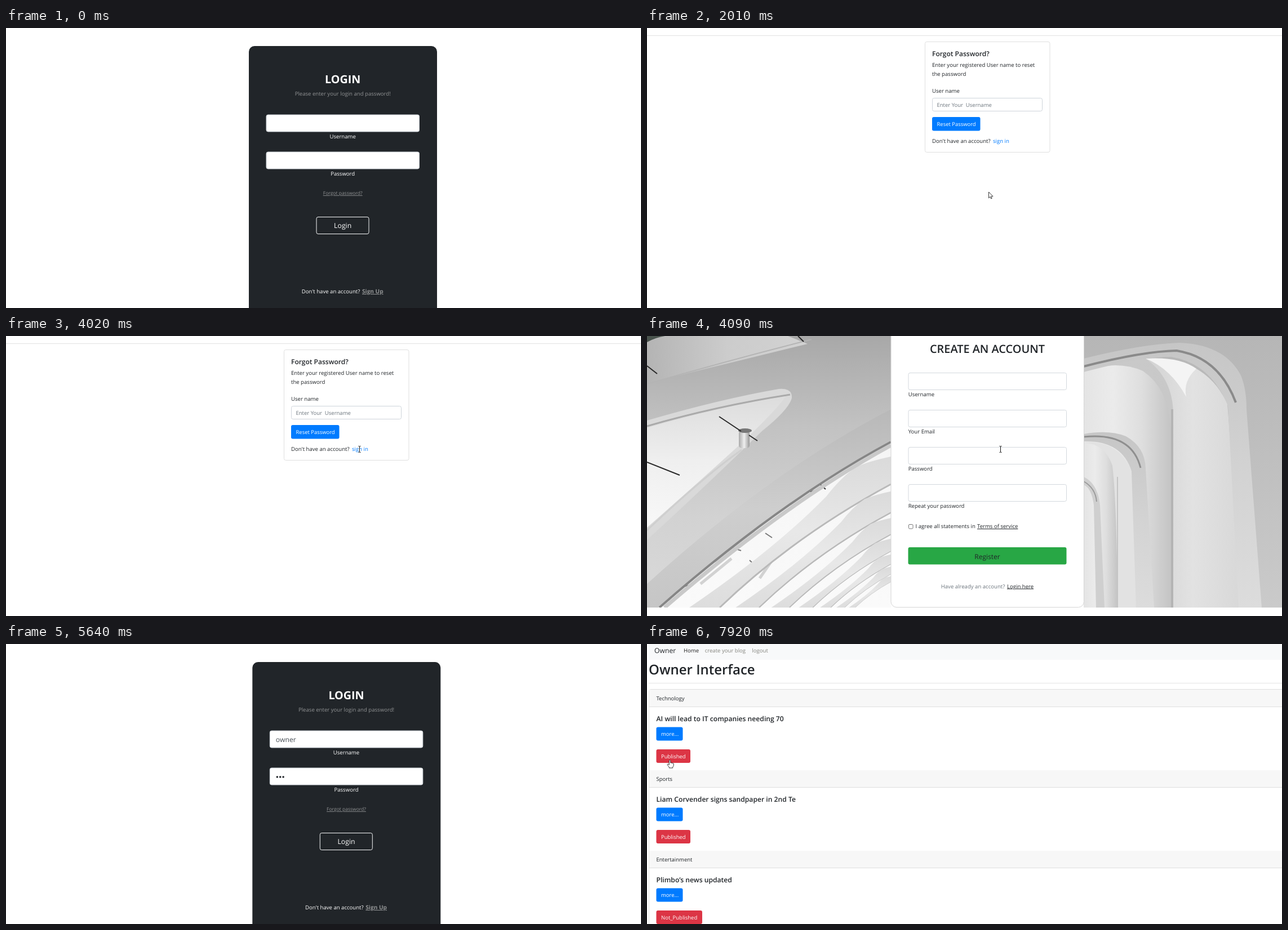
These frames come from a looping animation (1127 px wide and 497 px high, 7990 ms). An HTML page:

```html
<!DOCTYPE html>
<html lang="en">
<head>
<meta charset="utf-8">
<title>Blog accounts</title>
<style>
html, body { margin: 0; width: 100%; height: 100%; overflow: hidden; background: #fff; }
svg { display: block; width: 1127px; height: 497px; }
text { font-family: "Open Sans", "Noto Sans", sans-serif; white-space: pre; text-rendering: geometricPrecision; }
.u { text-decoration: underline; }
.mid { text-anchor: middle; }
</style>
</head>
<body>
<svg id="stage" viewBox="0 0 1127 497" xmlns="http://www.w3.org/2000/svg"></svg>
<script>
const LOOP = 7990;
const INK = '#212529', GREY = '#919394', BLUE = '#007bff', RED = '#dc3545', EDGE = '#ced4da';
const BODY = 9.58;

const text = (x, y, str, { size = BODY, fill = INK, weight = 400, cls = '' } = {}) =>
  `<text x="${x}" y="${y}" font-size="${size}" fill="${fill}" font-weight="${weight}" class="${cls}">${str}</text>`;
const box = (x, y, w, h, fill, stroke = 'none', r = 3) =>
  `<rect x="${x}" y="${y}" width="${w}" height="${h}" rx="${r}" fill="${fill}" stroke="${stroke}"/>`;
const path = (d, fill, stroke = 'none', width = 1) =>
  `<path d="${d}" fill="${fill}" stroke="${stroke}" stroke-width="${width}"/>`;
const grad = (id, x2, y2, ...stops) =>
  `<linearGradient id="${id}" x1="0" y1="0" x2="${x2}" y2="${y2}">` +
  stops.map((c, i) => `<stop offset="${i / (stops.length - 1)}" stop-color="${c}"/>`).join('') +
  '</linearGradient>';
const group = (id, content) => `<g id="${id}">${content}</g>`;

function login() {
  const c = 597.7;
  const mid = (y, str, o) => text(c, y, str, { cls: 'mid', fill: '#fff', ...o });
  return box(431, 32, 334, 500, INK, 'none', 10) +
    mid(98, 'LOGIN', { size: 19.7, weight: 700 }) +
    mid(119.5, 'Please enter your login and password!', { fill: GREY }) +
    box(462, 154, 271.5, 30, '#fff', EDGE) +
    mid(195.5, 'Username') +
    box(462, 220, 271.5, 30, '#fff', EDGE) +
    mid(261.5, 'Password') +
    mid(296, 'Forgot password?', { size: 8.5, fill: GREY, cls: 'mid u' }) +
    box(551, 335.5, 93, 30, 'none', '#f8f9fa') +
    mid(355, 'Login', { size: 12.3 }) +
    text(524.7, 471, 'Don\'t have an account?', { fill: '#fff' }) +
    text(632, 471, 'Sign Up', { fill: GREY, weight: 700, size: 10.1, cls: 'u' }) +
    group('filled', text(472.5, 174, 'owner', { size: 12.2, fill: '#495057' }) +
      [475, 480.4, 485.8].map(x => `<circle cx="${x}" cy="236" r="1.8" fill="${INK}"/>`).join(''));
}

function forgot() {
  return path('M0 13.5H1127', 'none', '#e2e2e2') +
    box(493.5, 24.5, 221.5, 196, '#fff', '#dfdfdf') +
    text(506, 50, 'Forgot Password?', { size: 12, weight: 600 }) +
    text(506, 69, 'Enter your registered User name to reset') +
    text(506, 84.5, 'the password') +
    text(506, 115, 'User name') +
    box(506.5, 124.5, 195, 23, '#fff', EDGE) +
    text(514.5, 139.7, 'Enter Your  Username', { size: 9.5, fill: '#6c757d' }) +
    box(506, 158, 85.5, 24.5, BLUE) +
    text(514.5, 174, 'Reset Password', { size: 9.45, fill: '#fff' }) +
    text(506, 204, 'Don\'t have an account?') +
    text(614, 204, 'sign in', { fill: BLUE });
}

// Ribs under the great beam, shrinking toward the lower right corner
function ribs() {
  const rib = path('M372 232Q345 250 318 285Q225 380 75 482H128Q260 355 433 262V214Q395 222 372 232Z', 'url(#rib)') +
    path('M433 263Q260 356 129 482', 'none', '#b9b9b9', 3);
  return [0, 1, 2, 3, 4, 5, 6].map(i =>
    `<g transform="translate(433 482) scale(${0.77 ** i}) translate(-433 -482)">${rib}</g>`).join('');
}

// Pale vaulted hall in soft grey tones
function hallLeft() {
  return box(0, 0, 433, 482, 'url(#air)', 'none', 0) +
    path('M115 375L132 380M152 376L167 381M85 406L104 410M182 398L194 409M210 350L222 358M60 446L76 442', 'none', '#777', 2) +
    path('M120 400L190 345M95 440L150 395M200 430L240 372', 'none', '#d2d2d2', 5) +
    ribs() +
    path('M290 277L298 274M308 264L317 272', 'none', '#333', 2) +
    path('M0 0H433V186Q240 288 20 482H0Z', 'url(#beam)') +
    path('M433 186Q240 288 20 482H0V440Q220 240 433 130Z', 'url(#belly)') +
    path('M433 188Q240 291 22 482', 'none', '#868686', 4) +
    path('M433 194Q246 296 31 482', 'none', '#c9c9c9', 7) +
    path('M0 0H250L285 14L0 84Z', 'url(#roof)') +
    path('M0 85Q150 42 292 6', 'none', '#b4b4b4', 2) +
    path('M0 150Q130 112 234 94Q258 92 257 110Q252 130 205 168Q95 275 0 362Z', '#d9d9d9') +
    path('M0 163Q120 128 246 106Q240 121 168 190Q80 270 0 340Z', 'url(#sky)') +
    path('M0 160Q125 124 254 104', 'none', '#aaaaaa', 3) +
    path('M0 345Q100 250 168 202', 'none', '#cfcfcf', 3) +
    box(163, 168, 19, 31, 'url(#lamp)', 'none', 5) +
    '<ellipse cx="174" cy="168" rx="12" ry="4" fill="#777"/>' +
    path('M128 143L167 169M181 176L196 186M0 224L58 247M0 53L18 67M268 0L278 10', 'none', '#292929', 2) +
    path('M0 0H32Q14 3 0 11Z', '#49534d');
}

function hallRight() {
  return box(775, 0, 352, 482, 'url(#wall)', 'none', 0) +
    path('M775 55Q860 38 915 40Q938 60 935 130V482H775Z', 'url(#side)') +
    path('M775 62Q835 42 880 62Q925 92 930 165V482H775Z', 'url(#niche)') +
    path('M885 40Q920 38 951 47Q1005 66 1030 120Q1044 290 1052 482H934V140Q934 75 885 40Z', 'url(#pillar)') +
    path('M885 40Q930 58 957 108Q951 80 975 58Q945 36 885 40Z', '#f4f4f4') +
    path('M775 40Q880 14 945 12Q1025 15 1054 70Q1064 94 1064 130L1091 482H1050L1031 124Q1000 48 930 37Q880 36 775 64Z', 'url(#arch)') +
    path('M775 54Q880 27 940 26Q1015 38 1045 118', 'none', '#8a8a8a', 4) +
    path('M932 130V482', 'none', '#b4b4b4', 4) +
    path('M775 190Q835 182 858 238Q870 340 874 482H835Q833 300 826 230Q806 190 775 192Z', '#e2e2e2') +
    path('M775 190Q812 190 826 230Q834 300 835 482H775Z', 'url(#niche)') +
    path('M775 174Q820 166 850 178Q884 197 885 235L900 482H868L860 240Q843 185 775 187Z', 'url(#arch)') +
    path('M775 179Q860 170 876 234', 'none', '#8f8f8f', 3) +
    path('M835 250V482', 'none', '#c4c4c4', 2) +
    path('M775 250Q800 262 804 300L812 482H797L793 300Q789 270 775 264Z', '#cfcfcf') +
    path('M775 258Q796 270 798 294', 'none', '#9a9a9a', 2);
}

function signup() {
  const fields = ['Username', 'Your Email', 'Password', 'Repeat your password'];
  return `<g clip-path="url(#photo)">${hallLeft() + hallRight()}</g>` +
    box(433, -20, 342.5, 501.5, '#fff', '#d5d5d5', 10) +
    text(604, 30.3, 'CREATE AN ACCOUNT', { size: 19.9, weight: 600, cls: 'mid' }) +
    fields.map((f, i) => box(464, 65.5 + i * 66, 280.5, 30, '#fff', '#d3d8dd') + text(463.7, 107 + i * 66, f)).join('') +
    box(464.5, 334.5, 7.5, 7.5, '#fff', '#767676', 1.5) +
    text(476.5, 341, 'I agree all statements in') +
    text(586, 341, 'Terms of service', { cls: 'u' }) +
    box(463.5, 375, 281, 30.5, '#28a745') +
    text(604, 395.5, 'Register', { size: 12, cls: 'mid' }) +
    text(521.7, 447.5, 'Have already an account?', { fill: '#6c757d' }) +
    text(639, 447.5, 'Login here', { cls: 'u' });
}

function board() {
  const posts = [
    ['Technology', 'AI will lead to IT companies needing 70', 'Published', 60.5],
    ['Sports', 'Liam Corvender signs sandpaper in 2nd Te', 'Published', 60.5],
    ['Entertainment', 'Plimbo’s news updated', 'Not_Published', 81.5]
  ];
  const button = (y, w, fill, label) =>
    box(14.5, y, w, 24, fill) + text(23, y + 15.5, label, { size: 9.5, fill: '#fff' });
  return box(1, -20, 1130, 36, '#f8f9fa', 'none', 0) +
    text(11, 4, 'Owner', { size: 12.2 }) +
    text(63, 3, 'Home', { fill: '#222' }) +
    text(100.7, 3, 'create your blog', { fill: '#85857f' }) +
    text(184.3, 3, 'logout', { fill: '#85857f' }) +
    text(1, 42, 'Owner Interface', { size: 24, weight: 600 }) +
    path('M1 57.5H1130', 'none', '#e5e5e5') +
    box(1.5, 68.5, 1140, 600, '#fff', '#dfdfdf') +
    posts.map(([topic, title, state, w], i) =>
      `<g transform="translate(0 ${i * 143})">` +
      box(2, 69, 1140, 30.5, '#f7f7f7', 'none', 0) +
      path('M2 99.5H1130', 'none', '#dfdfdf') +
      text(14.5, 87.7, topic, { size: 9.5 }) +
      text(14.5, 125, title, { size: 12.15, weight: 600 }) +
      button(135.5, 47, BLUE, 'more...') +
      button(175, w, RED, state) + '</g>').join('');
}

const pointers =
  group('arrow', path('M0 0V10.8L2.5 8.5L4.1 12L5.7 11.3L4.2 7.9H7.6Z', '#fff', '#222', 0.9)) +
  group('hand', path('M-1.2 1Q0 -.8 1.2 1V5Q2.3 4.2 3.3 5.3Q4.4 4.6 5.2 5.8Q6.4 5.4 6.7 6.8V9.5Q6.4 11.4 5.2 12.2V14H-1.2V12.6Q-2.8 10.8-4.3 8.4Q-4.2 6.7-2.6 7.2L-1.2 8.5Z', '#fff', '#222', 0.9)) +
  group('beamcur', path('M-2 -5.5H-.6L0 -4.9L.6 -5.5H2M-2 5.5H-.6L0 4.9L.6 5.5H2M0 -5V5', 'none', '#111', 1));

const $ = id => document.getElementById(id);
$('stage').innerHTML = '<defs>' +
  '<clipPath id="photo"><rect width="1127" height="482"/></clipPath>' +
  grad('air', 0, 1, '#ececec', '#f6f6f6', '#fafafa') +
  grad('beam', 0, 1, '#a8a8a8', '#c2c2c2', '#d2d2d2', '#dadada') +
  grad('belly', 0, 1, '#b8b8b8', '#cecece', '#c6c6c6') +
  grad('roof', 1, 0, '#b4b4b4', '#cccccc', '#d2d2d2') +
  grad('sky', 0, 1, '#dcdcdc', '#efefef', '#f8f8f8') +
  grad('rib', 0, 1, '#dadada', '#e8e8e8', '#dddddd') +
  grad('lamp', 1, 0, '#aaa', '#eee', '#999') +
  grad('wall', 0, 1, '#b6b6b6', '#c0c0c0', '#cacaca') +
  grad('side', 0, 1, '#c9c9c9', '#c6c6c6', '#bdbdbd') +
  grad('niche', 1, 0, '#e4e4e4', '#ebebeb', '#dedede', '#c4c4c4') +
  grad('pillar', 1, 0, '#d2d2d2', '#e2e2e2', '#d8d8d8') +
  grad('arch', 0, 1, '#c6c6c6', '#d3d3d3', '#dcdcdc') +
  '</defs>' + box(0, 0, 1127, 497, '#fff', 'none', 0) +
  group('login', login()) + group('forgot', forgot()) + group('signup', signup()) + group('board', board()) + pointers;

const scenes = ['login', 'forgot', 'signup', 'board'];
const kinds = ['arrow', 'hand', 'beamcur'];
const nodes = Object.fromEntries([...scenes, ...kinds, 'filled'].map(id => [id, $(id)]));
const show = (id, on) => { nodes[id].style.display = on ? '' : 'none'; };
const move = (id, x, y) => nodes[id].setAttribute('transform', `translate(${x} ${y})`);

// Progress 0..1 between two times, held on n screen updates
const steps = (t, from, to, n) =>
  Math.max(0, Math.min(1, Math.floor((t - from) / (to - from) * (n - 1) + 1e-6) / (n - 1)));
const easeOut = p => 1 - (1 - p) ** 2;
const lerp = (a, b, p) => a + (b - a) * p;
const smooth = p => p * p * (3 - 2 * p);

function pointer(t) {
  if (t < 340) return null;
  if (t < 2010) {
    const p = easeOut(steps(t, 340, 1110, 12));
    const q = steps(t, 1170, 1450, 5);
    const x = lerp(lerp(1066, 621, p), 605, q), y = lerp(464, 291, p);
    return [x < 633 && y < 300 ? 'hand' : 'arrow', x, y];
  }
  if (t < 3950) {
    const p = smooth(steps(t, 2800, 3490, 11));
    const x = lerp(606.5, 627, p) + 5 * Math.sin(Math.PI * p), y = lerp(291, 200, p);
    return [y < 206 ? 'hand' : 'arrow', x, t < 3690 ? y : y - 1];
  }
  if (t < 4280) return ['beamcur', 627.5, 201];
  if (t < 4850) {
    const p = steps(t, 4210, 4850, 10) ** 1.4;
    const x = lerp(627.5, 1022, p), y = lerp(201, 500, p);
    return [x < 744 && y < 227 ? 'beamcur' : 'arrow', x, y];
  }
  if (t < 7580) return null;
  const p = easeOut(steps(t, 7580, 7920, 6));
  const x = lerp(151, 40.5, p), y = lerp(294, 206, p);
  return [x < 77 && y < 212 ? 'hand' : 'arrow', x, y];
}

function draw(t) {
  const scene = t < 2010 ? 'login' : t < 4090 ? 'forgot' : t < 5640 ? 'signup' : t < 6300 ? 'login' : 'board';
  scenes.forEach(id => show(id, id === scene));
  const back = t >= 5640;
  show('filled', back);
  move('login', back ? 6.3 : 0, 0);
  const shift = t < 7110 ? 0 : lerp(0.25, 1, steps(t, 7110, 7310, 4));
  move('board', 2 * shift, 12 * shift);
  const cur = pointer(t);
  kinds.forEach(k => show(k, cur && cur[0] === k));
  if (cur) move(...cur);
}

const start = performance.now();
function tick() {
  draw((performance.now() - start) % LOOP);
  requestAnimationFrame(tick);
}
tick();
</script>
</body>
</html>
```
